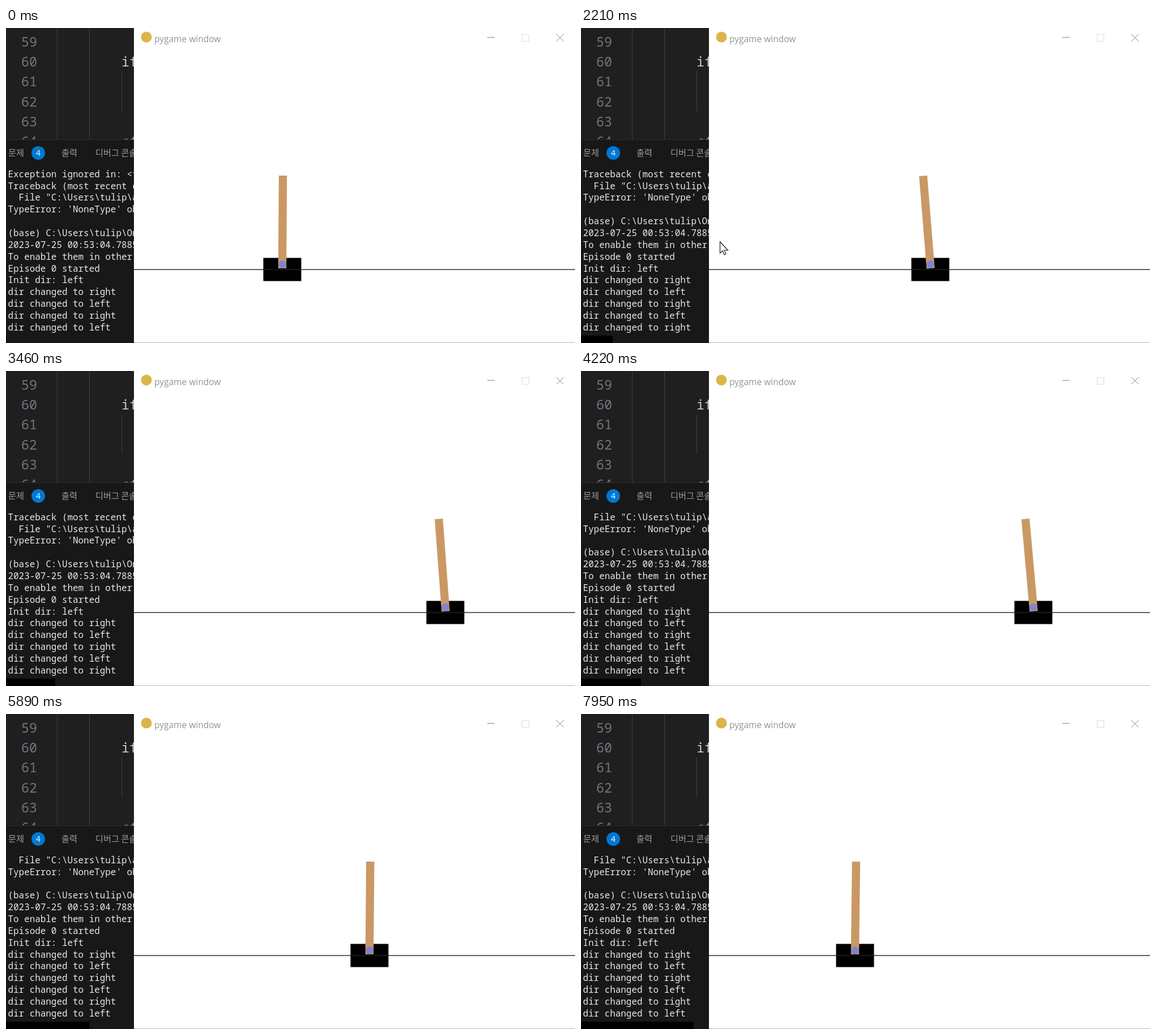
Write an HTML page with a canvas that moves like this. It is 1005x557 px and loops after 8000 ms.

```html
<!DOCTYPE html>
<html lang="ko">
<head>
<meta charset="utf-8">
<style>
html, body { margin: 0; width: 100%; height: 100%; overflow: hidden; background: #fff; }
canvas { display: block; }
</style>
</head>
<body>
<canvas id="stage" width="1005" height="557"></canvas>
<script>
const ctx = document.getElementById('stage').getContext('2d');
const LOOP = 8000, STEP = 69.3, EDGE = 226;
const MONO = '"Noto Sans Mono", monospace';
const KOREAN = '"Noto Sans CJK KR", "Noto Sans CJK", sans-serif';

const log = [
  'Exception ignored in: <function',
  'Traceback (most recent call last)',
  '  File "C:\\Users\\tulip\\ana',
  "TypeError: 'NoneType' object",
  '',
  '(base) C:\\Users\\tulip\\One',
  '2023-07-25 00:53:04.788528',
  'To enable them in other',
  'Episode 0 started',
  'Init dir: left',
  ...Array.from({ length: 6 }, (_, i) => 'dir changed to ' + (i % 2 ? 'left' : 'right'))
];

// Turning points of the run: time, cart x, pole lean in degrees
const poses = [[0, 488, 0.4], [800, 431, 8.8], [1380, 454, 7.7], [2210, 615.5, -4.6],
  [2900, 727, -1.5], [3460, 776, -4.2], [3920, 805.5, -6], [4930, 737, -0.4],
  [5890, 642, 0.5], [7950, 484, 0.7]];

const clamp = v => Math.min(Math.max(v, 0), 1);

// Smooth curve through one column of the poses
function follow(column, t) {
  const last = poses.length - 1;
  const span = k => poses[k + 1][0] - poses[k][0];
  const rate = k => (poses[k + 1][column] - poses[k][column]) / span(k);
  const slope = k => {
    if (k === 0) return rate(0);
    if (k === last) return rate(last - 1);
    return (rate(k - 1) * span(k) + rate(k) * span(k - 1)) / (span(k - 1) + span(k));
  };
  let i = 0;
  while (i < last - 1 && t > poses[i + 1][0]) i++;
  const d = span(i), u = clamp((t - poses[i][0]) / d), w = 1 - u;
  return poses[i][column] * w * w * (1 + 2 * u) + poses[i + 1][column] * u * u * (3 - 2 * u)
    + d * u * w * (slope(i) * w - slope(i + 1) * u);
}

function rect(color, x, y, w, h) {
  ctx.fillStyle = color;
  ctx.fillRect(x, y, w, h);
}

function circle(color, x, y, r) {
  ctx.fillStyle = color;
  ctx.beginPath();
  ctx.arc(x, y, r, 0, 7);
  ctx.fill();
}

function text(str, x, y, font, color) {
  ctx.font = font;
  ctx.fillStyle = color;
  ctx.fillText(str, x, y);
}

function line(color, x1, y1, x2, y2) {
  ctx.strokeStyle = color;
  ctx.lineWidth = 1;
  ctx.beginPath();
  ctx.moveTo(x1, y1);
  ctx.lineTo(x2, y2);
  ctx.stroke();
}

function drawEditor() {
  const font = '23.2px ' + MONO;
  rect('#1f1f1f', 0, 0, EDGE, 197);
  line('#404040', 90.5, 0, 90.5, 197);
  line('#404040', 147.5, 0, 147.5, 197);
  line('#404040', 204.5, 77, 204.5, 147);
  for (let i = 0; i < 6; i++) text(59 + i, 27, 33 + i * 35.2, font, '#6e7681');
  text('if', 204, 68, font, '#cccccc');
  text('st', 205, 209, font, '#7fb5d5');
}

function drawTerminal(t) {
  const tab = '15.2px ' + KOREAN;
  rect('#181818', 0, 197, EDGE, 360);
  rect('#2b2b2b', 0, 197, EDGE, 1);
  text('문제', 4, 226, tab, '#9d9d9d');
  text('출력', 98, 226, tab, '#9d9d9d');
  text('디버그 콘솔', 158, 226, tab, '#9d9d9d');
  circle('#0078d4', 57, 221, 12);
  text('4', 53, 226, '14px "Open Sans", sans-serif', '#fff');
  // A new row is printed whenever the cart turns round
  const first = (t > 740) + (t > 3870);
  log.slice(first, first + 14).forEach((row, i) =>
    text(row, 3.5, 263.7 + i * 20.85, '15.92px ' + MONO, '#e8e8e8'));
  rect('#000', 0, 544, 1 + t * 0.0248, 13);
}

function drawWindow() {
  rect('#fff', EDGE, 0, 1005 - EDGE, 557);
  rect('#b4b4b4', EDGE, 556, 1005 - EDGE, 1);
  circle('#dcb548', 248, 16, 9.5);
  text('pygame window', 262, 24.5, '15.5px "Open Sans", sans-serif', '#8d998d');
  line('#888', 850, 16.5, 863, 16.5);
  line('#888', 972, 11, 985, 23.5);
  line('#888', 985, 11, 972, 23.5);
  ctx.strokeStyle = '#dedede';
  ctx.strokeRect(911.5, 11.5, 12, 12);
}

function drawCartPole(t) {
  const x = Math.round(follow(1, t));
  rect('#000', x - 33.5, 406.5, 67, 41);
  ctx.save();
  ctx.translate(x, 418);
  ctx.rotate(follow(2, t) * Math.PI / 180);
  rect('#ca9865', -7.2, -157, 14.4, 164);
  ctx.restore();
  circle('#8184cb', x, 418, 7);
  rect('#222', EDGE, 426.4, 1005 - EDGE, 1.4);
}

function drawPointer(t) {
  if (t < 500 || t > 2260) return;
  const enter = clamp((t - 500) / 250), leave = clamp((t - 1760) / 440);
  ctx.save();
  ctx.translate(Math.round(981 - 77 * enter - 659 * leave) + 0.5,
    Math.round(490 - 29 * enter - 83 * leave));
  const arrow = new Path2D('M0 0V20L4.5 16L7.5 23L10.5 21.5L7.5 15H14Z');
  ctx.fillStyle = '#fff';
  ctx.fill(arrow);
  ctx.strokeStyle = '#111';
  ctx.lineWidth = 1.1;
  ctx.stroke(arrow);
  ctx.restore();
}

function draw() {
  const t = Math.floor((performance.now() % LOOP + 20) / STEP) * STEP;
  drawEditor();
  drawTerminal(t);
  drawWindow();
  drawCartPole(t);
  drawPointer(t);
  requestAnimationFrame(draw);
}
draw();
</script>
</body>
</html>
```
